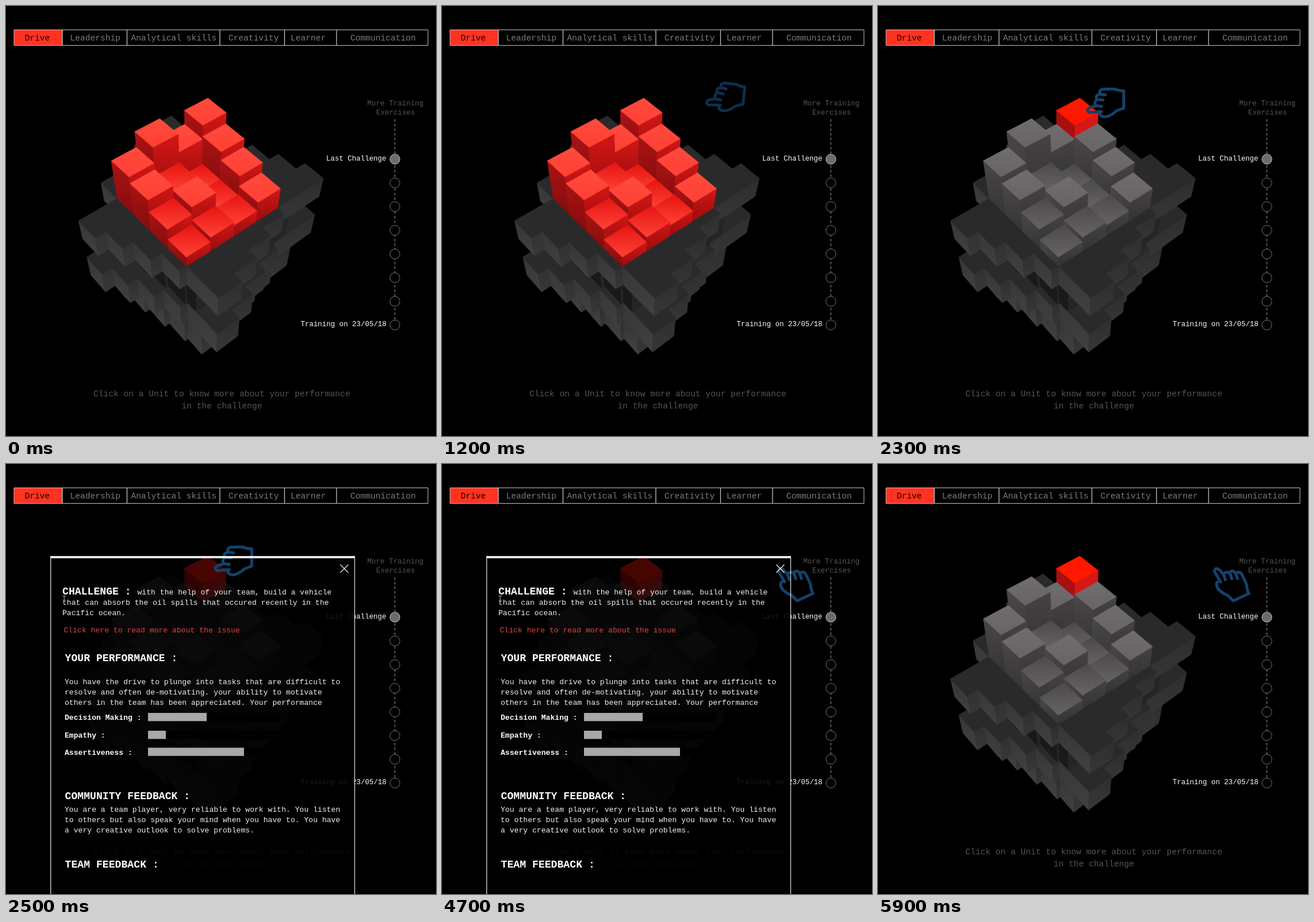
An HTML page for the animation above (6 s loop, 748 by 748 pixels).

```html
<!DOCTYPE html>
<html lang="en">
<head>
<meta charset="utf-8">
<title>Performance cube</title>
<style>
  html, body { margin: 0; width: 100%; height: 100%; overflow: hidden; background: #000; }
  svg { display: block; width: 100vw; height: 100vh; }
  text { font-family: "Liberation Mono", "Noto Sans Mono", monospace; white-space: pre; }
</style>
</head>
<body>
<svg id="stage" viewBox="0 0 748 748"></svg>
<script>
const LOOP = 6000, STEP = 100;
const HOVER = 1800, OPEN = 2500, CLOSE = 4800;

const line = (x1, y1, x2, y2, color, width = 1, extra = '') =>
  `<path d="M${x1},${y1}L${x2},${y2}" stroke="${color}" stroke-width="${width}" ${extra}/>`;
const rect = (x, y, w, h, fill) =>
  `<rect x="${x}" y="${y}" width="${w}" height="${h}" fill="${fill}"/>`;
const label = (x, y, size, fill, str, extra = '') =>
  `<text x="${x}" y="${y}" font-size="${size}" fill="${fill}" ${extra}>${str}</text>`;

// Grid to stage: i runs right-back, j left-back, h is height in pixels.
function project(i, j, h) {
  const depth = 1 + .015 * (i + j);
  const x = 314 + (42 * i - 32 * j) / depth;
  const y = 453 - (27 * i + 31.3 * j) / depth;
  return `${(x + (x - 335) * h * .0011).toFixed(1)},${(y - h).toFixed(1)}`;
}

const face = (corners, fill) =>
  `<path d="M${corners.map(c => project(...c)).join(' ')}Z" fill="${fill}" stroke="${fill}" stroke-width=".5" stroke-linejoin="round"/>`;

function box({ i, j, di = 1, dj = 1, low, high }, [top, left, right]) {
  const I = i + di, J = j + dj;
  return face([[i, j, high], [i, J, high], [i, J, low], [i, j, low]], left) +
    face([[i, j, high], [I, j, high], [I, j, low], [i, j, low]], right) +
    face([[i, j, high], [I, j, high], [I, J, high], [i, J, high]], top);
}

const nearest = (a, b) => b.i + b.j - a.i - a.j;

// Dark body: four layers, each a core with wings that grow around it like a pinwheel.
const THICK = 31.5, SPREAD = [1, .3, 1, .5];
const LIT = ['#2b2a2b', 'url(#sideLeft)', 'url(#sideRight)'];
const SHADED = ['#1c1b1c', '#1a191a', '#252426'];

function layer(level) {
  const low = -THICK * (level + 1), high = -THICK * level, spread = SPREAD[level];
  const boxes = [{ i: 0, j: 0, di: 4, dj: 4 }];
  for (let n = 0; n < 4; n++) {
    const frontLeft = (.3 + .43 * n) * spread, frontRight = (1.7 - .45 * n) * spread;
    boxes.push(
      { i: -frontLeft, j: n, di: frontLeft },
      { i: n, j: -frontRight, dj: frontRight },
      { i: 4, j: n, di: (2.2 - .43 * n) * spread },
      { i: n, j: 4, dj: (1 + .4 * n) * spread });
  }
  const behind = b => b.i >= 4 || b.j >= 4 ? 0 : b.di === 4 ? 1 : 2;
  return boxes.sort((a, b) => behind(a) - behind(b) || nearest(a, b))
    .map(b => box({ ...b, low, high }, level === 1 ? SHADED : LIT)).join('');
}

const body = [3, 2, 1, 0].map(layer).join('');

// Unit heights, one row per i.
const UNIT = 16;
const HEIGHTS = [[1, 2.1, 3.4, 4.1], [1.5, 2.9, 2.7, 5.8], [1.2, 1.1, 1.1, 3.8], [2.1, 3.2, 4.1, 5.3]];
const HOT = ['#ff1800', '#a80f0f', '#d51717'];
const cells = HEIGHTS.flatMap((row, i) => row.map((height, j) => ({ i, j, low: 0, high: height * UNIT }))).sort(nearest);
const chosen = cells[0];

const units = (name, selected) => cells.map(cell => {
  const floor = cell.i < 3 && cell.high < 2.8 * UNIT;
  const colors = [floor ? 'Floor' : 'Top', 'Left', 'Right'].map(part => `url(#${name}${part})`);
  return box(cell, selected && cell === chosen ? HOT : colors);
}).join('');

const gradient = (id, from, to) =>
  `<linearGradient id="${id}" x2="0" y2="1"><stop stop-color="${from}"/><stop offset="1" stop-color="${to}"/></linearGradient>`;
const defs = `<defs>
  ${gradient('sideLeft', '#373637', '#424042')}
  ${gradient('sideRight', '#2e2d2f', '#383638')}
  ${gradient('redTop', '#ff4b3d', '#ff3f34')}
  ${gradient('redFloor', '#e61410', '#ff4237')}
  ${gradient('redLeft', '#a91314', '#850c0d')}
  ${gradient('redRight', '#d21615', '#980c0d')}
  ${gradient('grayTop', '#716d6f', '#676466')}
  ${gradient('grayFloor', '#4c494b', '#676466')}
  ${gradient('grayLeft', '#4a4748', '#363435')}
  ${gradient('grayRight', '#454244', '#343233')}
</defs>`;

function nav() {
  const tabs = [['Leadership', 111.5], ['Analytical skills', 217.5], ['Creativity', 387], ['Learner', 495], ['Communication', 599]];
  return rect(14, 41.5, 84, 27.5, '#ff3320') + label(32.5, 59.5, 14.6, '#160000', 'Drive') +
    tabs.map(([name, x]) => label(x, 59.5, 14.6, '#7d7d7d', name)).join('') +
    '<path d="M14,41.5H734V68.5H14Z" fill="none" stroke="#c4c4c4"/>' +
    [98, 210.5, 372, 484.5, 575].map(x => line(x, 41, x, 69, '#c4c4c4', 1.3)).join('');
}

function timeline() {
  let stops = '';
  for (let n = 0; n < 8; n++)
    stops += `<circle cx="676.5" cy="${266.5 + 41.2 * n}" r="8.6" fill="${n ? '#000' : '#6b6b6b'}" stroke="${n ? '#777' : '#ccc'}"/>`;
  return label(628.5, 172.5, 12.55, '#555', 'More Training') + label(644, 189, 12.5, '#555', 'Exercises') +
    line(676.5, 197, 676.5, 546, '#999', 1, 'stroke-dasharray="4.5 3.5"') + stops +
    label(557, 269, 12.45, '#fff', 'Last Challenge') + label(512.5, 557, 12.45, '#fff', 'Training on 23/05/18');
}

const hint = label(152, 679, 14.6, '#555', 'Click on a Unit to know more about your performance') +
  label(305.5, 700, 14.6, '#555', 'in the challenge');

function panel() {
  const white = '#f2f2f2', bold = 'font-weight="bold"';
  const heading = (x, y, str) => label(x, y, 18.15, '#fff', str, bold);
  const lines = (x, y, rows) => rows.map((row, n) => label(x, y + n * 18, 13.1, white, row)).join('');
  const bar = (name, base, value, full) => label(102, base, 13.1, '#fff', name, bold) +
    rect(247, base - 12, full, 14.3, '#000') + rect(247, base - 12, value, 14.3, '#a9a7aa');
  return line(77, 162, 607, 162, '#e6e6e6', 4) +
    line(77.7, 162, 77.7, 748, '#ccc', 1.4) + line(606.5, 162, 606.5, 748, '#ccc', 1.4) +
    line(581.5, 175, 595.5, 189, '#eee', 1.2) + line(595.5, 175, 581.5, 189, '#eee', 1.2) +
    heading(98, 227, 'CHALLENGE :') + label(228.5, 227, 13.1, white, 'with the help of your team, build a vehicle') +
    lines(98, 245, ['that can absorb the oil spills that occured recently in the', 'Pacific ocean.']) +
    '<path d="M98.5,229.5H104M101.2,229.5V238.5M98.5,238.5H104" fill="none" stroke="#aaa" stroke-width="1.2"/>' +
    label(100.5, 293, 13.1, '#d9493f', 'Click here to read more about the issue') +
    heading(102.5, 343, 'YOUR PERFORMANCE :') +
    lines(102, 383, ['You have the drive to plunge into tasks that are difficult to',
      'resolve and often de-motivating. your ability to motivate',
      'others in the team has been appreciated. Your performance']) +
    bar('Decision Making :', 445, 102, 230) + bar('Empathy :', 476, 31, 228) + bar('Assertiveness :', 505.5, 167, 211) +
    heading(102.5, 583, 'COMMUNITY FEEDBACK :') +
    lines(102, 605, ['You are a team player, very reliable to work with. You listen',
      'to others but also speak your mind when you have to. You have',
      'a very creative outlook to solve problems.']) +
    heading(102.5, 702, 'TEAM FEEDBACK :');
}

const HAND = `M31,-21Q21,-21 16,-24L-4,-24Q-13,-23 -10,-15L-1,-14M-10,-15Q-19,-14 -16,-6L-5,-5
  M-16,-6Q-22,1 -17,5L-8,6M-17,5L-28,8Q-36,13 -29,17L-8,15Q-14,21 -5,24Q5,26 18,14L31,9L31,-21`;

const stage = document.getElementById('stage');
stage.innerHTML = `${defs}<rect width="748" height="748"/>${nav()}${timeline()}${hint}${body}
  <g id="red">${units('red')}</g>
  <g id="gray">${units('gray', true)}</g>
  <g id="scrim">${rect(77, 160, 530, 588, 'rgba(0,0,0,.9)')}<g opacity=".2">${box({ ...chosen, low: chosen.high - 32 }, HOT)}</g></g>
  <path id="hand" d="${HAND}" fill="none" stroke="#14426a" stroke-width="5" stroke-linecap="round" stroke-linejoin="round"/>
  <g id="panel">${panel()}</g>`;
const [red, gray, scrim, hand, sheet] = ['red', 'gray', 'scrim', 'hand', 'panel'].map(id => document.getElementById(id));

const ENTER = { x: 678, y: 139, turn: 18 };
const POINT = { x: 396.5, y: 168.5, turn: 0 };
const DISMISS = { x: 613, y: 206, turn: 65 };

function glide(a, b, t, from, to) {
  const p = Math.min(1, Math.max(0, (t - from) / (to - from)));
  const ease = (1 - Math.cos(Math.PI * p)) / 2;
  const mix = key => a[key] + (b[key] - a[key]) * ease;
  return `translate(${mix('x')} ${mix('y')}) rotate(${mix('turn')})`;
}

const show = (el, on) => el.setAttribute('visibility', on ? 'visible' : 'hidden');

function render(t) {
  hand.setAttribute('transform', t < OPEN ? glide(ENTER, POINT, t, 0, 2000) : glide(POINT, DISMISS, t, 4000, 4700));
  hand.setAttribute('opacity', Math.min(1, t / 1700));
  const open = t >= OPEN && t < CLOSE;
  show(red, t < HOVER);
  show(gray, t >= HOVER);
  show(scrim, open);
  show(sheet, open);
}

const start = performance.now();
function tick() {
  const t = (performance.now() - start) % LOOP;
  render(Math.floor(t / STEP) * STEP);
  requestAnimationFrame(tick);
}
tick();
</script>
</body>
</html>
```
